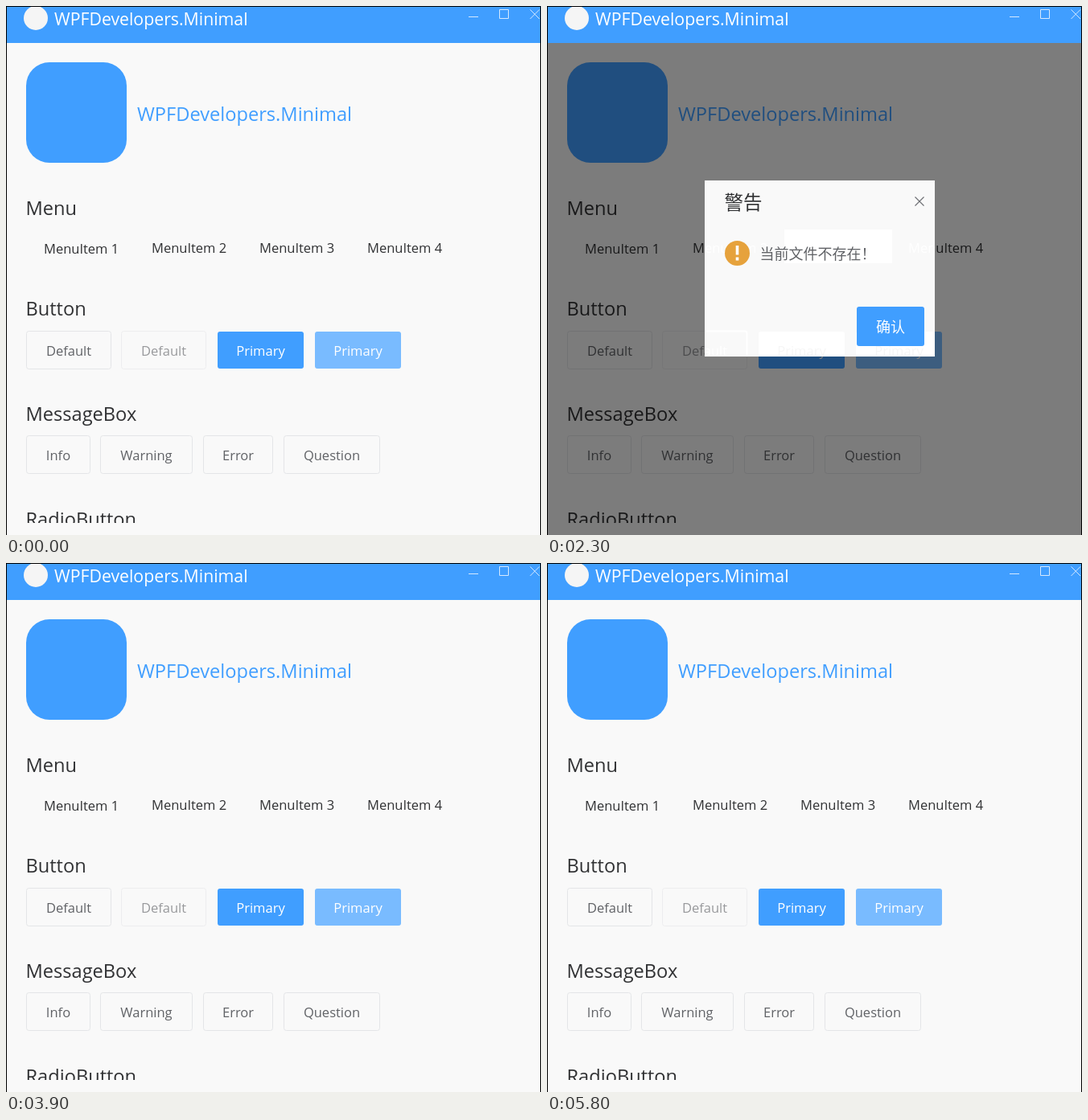
Recreate the animation shown at these times as an HTML page. Size 665x658 px, loop 6 s.

```html
<!DOCTYPE html>
<html lang="zh-CN">
<head>
<meta charset="utf-8">
<style>
  html, body { margin: 0; width: 100%; height: 100%; overflow: hidden; background: #f9f9f9; }
  svg { display: block; }
  text { font: 16.5px "Open Sans", sans-serif; fill: #303133; }
  .h { font-size: 23.6px; }
  .mid { text-anchor: middle; }
  .cjk { font: 18px "Noto Sans CJK SC", "Noto Sans CJK", sans-serif; fill: #606266; }
  .title { font-size: 23.5px; fill: #303133; }
  .btn rect { fill: #f9f9f9; stroke: #e4e5e8; }
  .btn text { fill: #606266; }
  .off rect { stroke: #ededef; }
  .off text { fill: #98999c; }
  .hover rect { fill: #ecf5ff; stroke: #c6e2ff; }
  .hover text { fill: #409eff; }
  .solid rect { fill: #409eff; stroke: none; }
  .solid text { fill: #fff; }
  .solid.off rect { fill: #79bbff; }
  .solid.hover rect { fill: #66b1ff; }
  .ghost text { fill: #fff; }
  .ghost .faint { fill: #f6f6f6; }
</style>
</head>
<body>
<svg id="stage" width="665" height="658" viewBox="0 0 665 658"></svg>
<script>
const LOOP = 6000, BLUE = '#409eff';

// Times: hover the button, dim the page, dialog open, hover OK, start closing, gone.
const dialogs = [
  { name: 'Info', bx: 25, bw: 80, x: 196, w: 286, color: '#67c23a', icon: '!', title: '消息', text: '文件删除成功。',
    times: [600, 900, 1100, 1600, 1700, 1800] },
  { name: 'Warning', bx: 117, bw: 115, x: 196, w: 286, color: '#e6a23c', icon: '!', title: '警告', text: '当前文件不存在！',
    times: [2000, 2200, 2300, 2700, 2800, 2900] },
  { name: 'Error', bx: 245, bw: 87, x: 196, w: 286, color: '#f56c6c', icon: 'x', title: '错误', text: '当前文件不存在。',
    times: [3100, 3200, 3300, 3800, 3800, 3900] },
  { name: 'Question', bx: 345, bw: 120, x: 153, w: 372, color: BLUE, icon: '?', title: '询问', text: '当前文件不存在,是否继续?',
    times: [4100, 4200, 4300, 4800, 5200, 5400] },
];
const menuX = [47, 181, 315, 449];

const text = (x, y, s, cls = '', attrs = '') => `<text x="${x}" y="${y}" class="${cls}" ${attrs}>${s}</text>`;
const box = (x, y, w, h, fill, attrs = '') =>
  `<rect x="${x}" y="${y}" width="${w}" height="${h}" fill="${fill}" ${attrs}/>`;
const line = (d, color, width = 1) => `<path d="${d}" fill="none" stroke="${color}" stroke-width="${width}"/>`;

function button(x, y, w, h, label, cls = '', textCls = '', id = '') {
  const inset = cls.includes('solid') ? 0 : .5;
  return `<g class="btn ${cls}" id="${id}">` +
    box(x + inset, y + inset, w - 2 * inset, h - 2 * inset, '', 'rx="3"') +
    text(x + w / 2, y + h / 2 + (textCls ? 7.5 : 6.5), label, 'mid ' + textCls) + '</g>';
}

const menu = () => menuX.map((x, i) => text(x, i ? 307 : 308, 'MenuItem ' + (i + 1))).join('');

function page() {
  return box(0, 0, 665, 658, '#f9f9f9') +
    box(25, 70, 125, 125, BLUE, 'rx="29"') +
    text(163, 143, 'WPFDevelopers.Minimal', 'h', `style="fill:${BLUE}"`) +
    text(24.5, 260, 'Menu', 'h') +
    box(295, 278, 134, 42, '#fff', 'id="menuHover"') + menu() +
    text(24.5, 385, 'Button', 'h') +
    button(25, 404, 106, 48, 'Default') +
    button(143, 404, 106, 48, 'Default', 'off') +
    button(263, 405, 107, 46, 'Primary', 'solid') +
    button(384, 405, 107, 46, 'Primary', 'solid off') +
    text(24.5, 516, 'MessageBox', 'h') +
    dialogs.map((d, i) => button(d.bx, 534, d.bw, 48, d.name, '', '', 'open' + i)).join('') +
    `<svg width="665" height="643">${text(24.5, 647, 'RadioButton', 'h')}</svg>`;
}

function titleBar() {
  return box(0, 0, 665, 46, BLUE) +
    '<circle cx="37" cy="15" r="15" fill="#f5f5f5"/>' +
    text(60, 24, 'WPFDevelopers.Minimal', '', 'style="font-size:21.25px;fill:#fff"') +
    line('M575 13.5h12M613.5 4.5h11v11h-11zM651.5 4.5l11.5 11.5m0-11.5l-11.5 11.5', '#d5e9ff') +
    line('M0 .5H664.5V658M.5 0V658', '#000');
}

// Pale remains of the page that show through an open dialog.
function ghost(d, i) {
  return `<svg class="ghost" x="${d.x}" y="217" width="${d.w}" height="219" viewBox="${d.x} 217 ${d.w} 219">` +
    (i < 2 ? box(295, 278, 134, 42, '#fff') : '') + menu() +
    box(143.5, 404.5, 105, 47, 'none', 'rx="3" stroke="#fff" stroke-width="2"') +
    text(196, 434.5, 'Default', 'mid') +
    [263, 384].map(x => box(x, 405, 107, 46, '#fff', 'rx="3"') +
      text(x + 53.5, 434.5, 'Primary', 'mid faint')).join('') + '</svg>';
}

function icon(d) {
  const cx = d.x + 40.5, cy = 307.5;
  const marks = {
    '!': line(`M${cx} 298v11.5m0 3v4`, '#fff', 3.6),
    x: line(`M${cx - 6} ${cy - 6}l12 12m0-12l-12 12`, '#fff', 3.6),
    '?': line(`M${cx - 5} 304c0-7 10.5-7 10.5-1c0 4-5.5 4-5.5 8.5m0 2.5v3.5`, '#fff', 3),
  };
  return `<circle cx="${cx}" cy="${cy}" r="15.5" fill="${d.color}"/>` + marks[d.icon];
}

function dialog(d, i) {
  const right = d.x + d.w;
  return `<g id="dialog${i}">` + box(d.x, 217, d.w, 219, '#f9f9f9') + ghost(d, i) +
    text(d.x + 24.5, 252.5, d.title, 'cjk title') +
    line(`M${right - 24.5} 237.5l11 11m0-11l-11 11`, '#6c6e72', 1.1) +
    icon(d) + text(d.x + 68.5, 315, d.text, 'cjk') +
    (i === 3 ? button(right - 196, 373, 86, 51, '取消', '', 'cjk') : '') +
    button(right - 97, 374, 84, 49, '确认', 'solid', 'cjk', 'ok' + i) + '</g>';
}

const $ = id => document.getElementById(id);
$('stage').innerHTML = page() + box(0, 46, 665, 612, '#000', 'id="mask" opacity=".5"') +
  titleBar() + dialogs.map(dialog).join('');

const show = (id, opacity) => {
  $(id).style.opacity = opacity;
  $(id).style.visibility = opacity ? 'visible' : 'hidden';
};

function draw(t) {
  let dimmed = false;
  const within = (a, b) => t >= a && t < b;
  dialogs.forEach((d, i) => {
    const [hover, dim, open, ok, close, gone] = d.times;
    dimmed ||= within(dim, close);
    $('open' + i).classList.toggle('hover', within(hover, dim));
    $('ok' + i).classList.toggle('hover', within(ok, gone));
    show('dialog' + i, within(open, close) ? 1 : within(open - 100, open) ? .5 : within(close, gone) ? .4 : 0);
  });
  show('mask', dimmed ? .5 : 0);
  show('menuHover', within(200, 2900) ? (t < 300 ? .5 : 1) : 0);
}

const start = performance.now();
(function tick() {
  draw((performance.now() - start) % LOOP);
  requestAnimationFrame(tick);
})();
</script>
</body>
</html>
```
